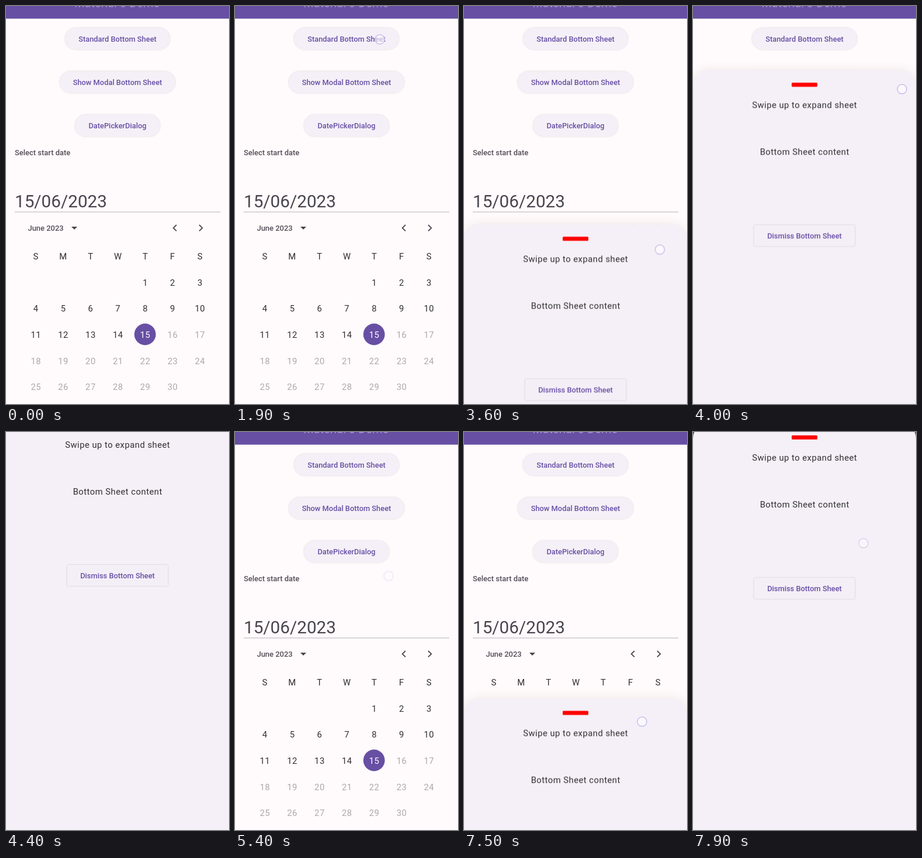
These frames come from a looping animation (382 px wide and 680 px high, 8000 ms). An HTML page:

```html
<!DOCTYPE html>
<html lang="en">
<head>
<meta charset="utf-8">
<title>Bottom sheet demo</title>
<style>
  html, body { margin: 0; width: 100%; height: 100%; overflow: hidden; background: #fffafb; }
  svg { display: block; width: 100%; height: 100%; }
  text { font-family: Roboto, sans-serif; fill: #302f34; }
  .mid { text-anchor: middle; }
  .title { font-size: 20px; fill: #a697c9; }
  .label { font-size: 12.85px; font-weight: 500; fill: #674fa4; }
  .body { font-size: 14.85px; letter-spacing: .46px; }
  .caption { font-size: 12.95px; font-weight: 500; fill: #514d57; }
  .date { font-size: 29.7px; fill: #49454f; }
  .off { fill: #aca8ac; }
  .picked { fill: #fff; }
  .raised { fill: #f5f0f7; filter: drop-shadow(0 .8px .8px rgba(0, 0, 0, .16)); }
  .card { fill: #f4eef7; filter: drop-shadow(0 .8px .8px rgba(0, 0, 0, .2)); }
  .panel { fill: #f5f0f7; filter: drop-shadow(0 0 9px rgba(60, 30, 30, .1)); }
  .icon { fill: none; stroke: #49454f; stroke-width: 1.8; }
</style>
</head>
<body>
<svg viewBox="0 0 382 680" preserveAspectRatio="none">
  <rect width="382" height="680" fill="#fffafb"/>
  <rect width="382" height="21.6" fill="#674fa4"/>
  <text class="title mid" x="190.5" y="2">Material 3 Demo</text>
  <g id="buttons"></g>
  <text class="caption" x="15" y="255">Select start date</text>
  <text class="date" x="15" y="343.5">15/06/2023</text>
  <rect x="15" y="351.3" width="352" height="1.2" fill="#c2bec5"/>
  <text class="caption" x="37.5" y="384">June 2023</text>
  <path d="M112 377h10l-5 5z" fill="#49454f"/>
  <path class="icon" d="M292 374l-5.3 5.2 5.3 5.2M331 374l5.3 5.2-5.3 5.2"/>
  <circle cx="238.2" cy="561" r="18.4" fill="#674fa4"/>
  <g id="calendar"></g>
  <g id="sheet">
    <path class="panel" d="M0 800V26A26 26 0 0 1 26 0H356A26 26 0 0 1 382 26V800z"/>
    <rect x="169" y="20.7" width="44" height="7" rx="1.5" fill="#f00"/>
    <text class="body mid" x="191.2" y="64.4">Swipe up to expand sheet</text>
    <text class="body mid" x="191.2" y="144">Bottom Sheet content</text>
    <rect class="card" x="104.5" y="264" width="173" height="36" rx="2.5"/>
    <text class="label mid" x="191" y="287">Dismiss Bottom Sheet</text>
  </g>
  <circle id="touch" r="8" fill="#fff" fill-opacity=".6" stroke="#c6bbec" stroke-width="1.4"/>
</svg>
<script>
const LOOP = 8000, STEP = 20;
const HIDDEN = 710, PEEK = 624, EXPANDED = -37;
const byId = id => document.getElementById(id);

function add(parent, tag, attrs, content = '') {
  const node = document.createElementNS(parent.namespaceURI, tag);
  for (const [name, value] of Object.entries(attrs)) node.setAttribute(name, value);
  node.textContent = content;
  parent.append(node);
}

function pill(label, width, row) {
  const parent = byId('buttons'), y = 37.3 + 74.2 * row;
  add(parent, 'rect', { class: 'raised', x: 191 - width / 2, y, width, height: 37.2, rx: 18.6 });
  add(parent, 'text', { class: 'label mid', x: 191, y: y + 23.7 }, label);
}
pill('Standard Bottom Sheet', 180, 0);
pill('Show Modal Bottom Sheet', 198, 1);
pill('DatePickerDialog', 146, 2);

function cell(slot, content, style = '') {
  const x = 51.2 + 46.85 * (slot % 7), y = 433.2 + 44.6 * Math.floor(slot / 7);
  add(byId('calendar'), 'text', { class: `body mid ${style}`, x, y }, content);
}
[...'SMTWTFS'].forEach((day, column) => cell(column, day));
for (let day = 1; day <= 30; day++) {
  cell(day + 10, day, day > 15 ? 'off' : day === 15 ? 'picked' : '');
}

const span = (t, from, to) => Math.min(1, Math.max(0, (t - from) / (to - from)));
const mix = (a, b, p) => a + (b - a) * p;
const easeOut = p => 1 - (1 - p) ** 2;

// A tap is a press that stays in place; a drag moves from one point to another.
const tap = (start, x, y) => ({ start, end: start + 25, from: { x, y }, to: { x, y } });
const drag = (start, end, from, to) => ({ start, end, from, to });

const dismiss = tap(5200, 263, 246);
const visits = [
  { open: tap(1900, 248, 57), pull: drag(3220, 4000, { x: 314, y: 678 }, { x: 358, y: 142 }),
    release: 111, settle: 400 },
  { open: tap(6500, 248, 57), pull: drag(7340, 7800, { x: 312, y: 659 }, { x: 292, y: 190 }),
    release: 143, settle: 155 }
];
const presses = [visits[0].open, visits[0].pull, dismiss, visits[1].open, visits[1].pull];

function sheetTop(t) {
  const { open, pull, release, settle } = visits[t < visits[1].open.start ? 0 : 1];
  if (t >= pull.end) {
    const top = mix(release, EXPANDED, easeOut(span(t, pull.end, pull.end + settle)));
    return t < visits[1].open.start ? mix(top, HIDDEN, span(t, 5210, 5390)) : top;
  }
  if (t >= pull.start) return mix(PEEK, release, span(t, pull.start, pull.end));
  return mix(HIDDEN, PEEK, easeOut(span(t, open.end, open.end + 400)));
}

function touchPose(t) {
  const { start, end, from, to } = presses.findLast(press => t >= press.start - 30) ?? presses[0];
  const p = span(t, start, end);
  return {
    transform: `translate(${mix(from.x, to.x, p)}px, ${mix(from.y, to.y, p)}px)`,
    opacity: t < start - 30 ? 0 : 1 - span(t, end, end + 250)
  };
}

function play(id, pose) {
  const frames = Array.from({ length: LOOP / STEP + 1 }, (_, i) => pose(i * STEP));
  byId(id).animate(frames, { duration: LOOP, iterations: Infinity });
}
play('sheet', t => ({ transform: `translate(0px, ${sheetTop(t)}px)` }));
play('touch', touchPose);
</script>
</body>
</html>
```
